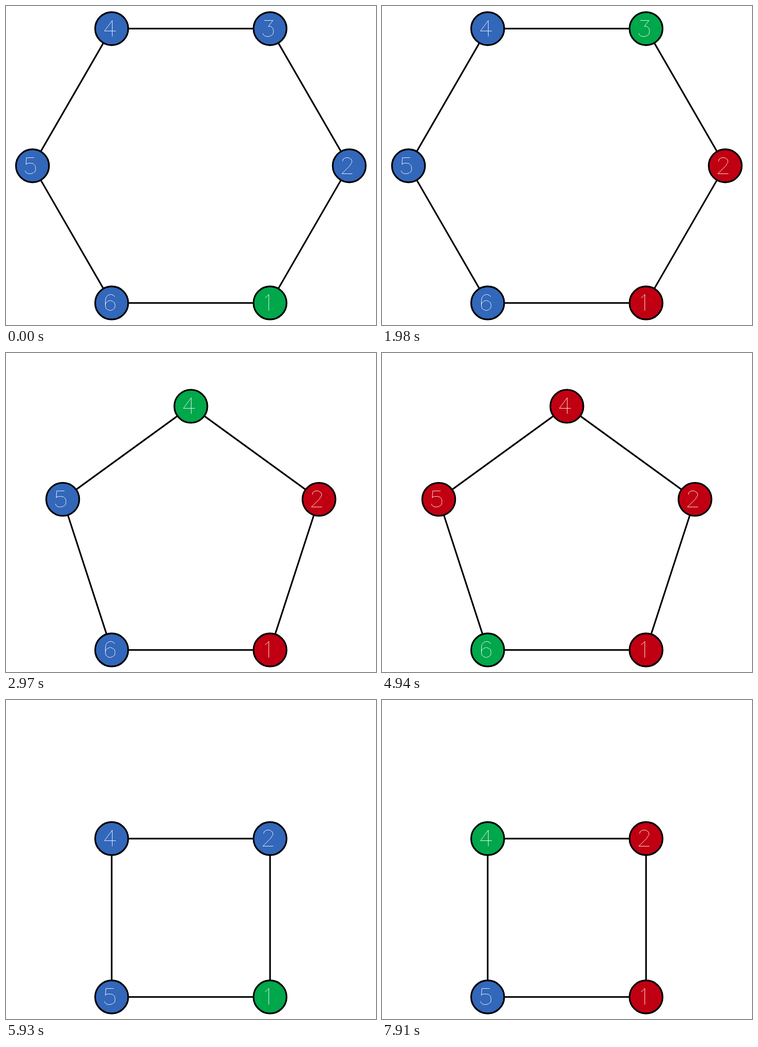
An HTML page with a canvas for the animation above (8 s loop, 806 px wide and 695 px high).

```html
<!DOCTYPE html>
<html lang="en">
<head>
<meta charset="utf-8">
<title>Counting out a ring</title>
<style>
  html, body { margin: 0; width: 100%; height: 100%; overflow: hidden; background: #fff; }
  canvas { display: block; }
</style>
</head>
<body>
<canvas width="806" height="695"></canvas>
<script>
const ctx = document.querySelector('canvas').getContext('2d');
const LOOP = 8000, SIDE = 345, CENTER_X = 402.7, BASE_Y = 646.9, RADIUS = 36;
const BLUE = '#3267ba', GREEN = '#00a74b', RED = '#c00012';

// Single-stroke digits on a 21-unit-high grid, y up from the baseline
const DIGITS = {
  1: '6,17 8,18 11,21 11,0',
  2: '4,16 4,17 5,19 6,20 8,21 12,21 14,20 15,19 16,17 16,15 15,13 13,10 3,0 17,0',
  3: '5,21 16,21 10,13 13,13 15,12 16,11 17,8 17,6 16,3 14,1 11,0 8,0 5,1 4,2 3,4',
  4: '13,0 13,21 3,7 18,7',
  5: '15,21 5,21 4,12 5,13 8,14 11,14 14,13 16,11 17,8 17,6 16,3 14,1 11,0 8,0 5,1 4,2 3,4',
  6: '16,18 15,20 12,21 10,21 7,20 5,17 4,12 4,7 5,3 7,1 10,0 11,0 14,1 16,3 17,6 17,7 16,10 14,12 11,13 10,13 7,12 5,10 4,7'
};
const DIGIT_SCALE = 5 / 3;

// Each step: start time, remaining labels, index of the active node
const STEPS = [
  [0, '123456', 0], [960, '123456', 1], [1980, '123456', 2],
  [2970, '12456', 2], [3960, '12456', 3], [4940, '12456', 4],
  [5930, '1245', 0], [6900, '1245', 1], [7910, '1245', 2]
];

// Regular polygon standing on its bottom side, counted upwards from bottom right
function polygon(n) {
  const half = Math.PI / n;
  const r = SIDE / (2 * Math.sin(half));
  const centerY = BASE_Y - r * Math.cos(half);
  return Array.from({ length: n }, (_, k) => {
    const a = Math.PI / 2 - half * (1 + 2 * k);
    return [CENTER_X + r * Math.cos(a), centerY + r * Math.sin(a)];
  });
}

function strokeLine(points, width, color) {
  ctx.beginPath();
  points.forEach(p => ctx.lineTo(...p));
  ctx.lineWidth = width;
  ctx.strokeStyle = color;
  ctx.stroke();
}

function drawNode(x, y, label, color) {
  ctx.beginPath();
  ctx.arc(x, y, RADIUS, 0, 2 * Math.PI);
  ctx.fillStyle = color;
  ctx.fill();
  ctx.lineWidth = 3.6;
  ctx.strokeStyle = '#000';
  ctx.stroke();

  const left = Math.floor(x) - 20.5, base = Math.floor(y) + 17.5;
  const points = DIGITS[label].split(' ').map(pair => {
    const [u, v] = pair.split(',').map(Number);
    return [left + Math.round(u * DIGIT_SCALE), base - Math.round(v * DIGIT_SCALE)];
  });
  strokeLine(points, 1, '#fff');
}

function draw(now) {
  const time = now % LOOP;
  const [, labels, active] = STEPS.findLast(([start]) => start <= time);
  const nodes = polygon(labels.length);
  ctx.fillStyle = '#fff';
  ctx.fillRect(0, 0, 806, 695);
  strokeLine([...nodes, nodes[0]], 3.5, '#000');
  nodes.forEach(([x, y], i) =>
    drawNode(x, y, labels[i], i < active ? RED : i === active ? GREEN : BLUE));
}

function tick() {
  draw(performance.now());
  requestAnimationFrame(tick);
}
tick();
</script>
</body>
</html>
```
